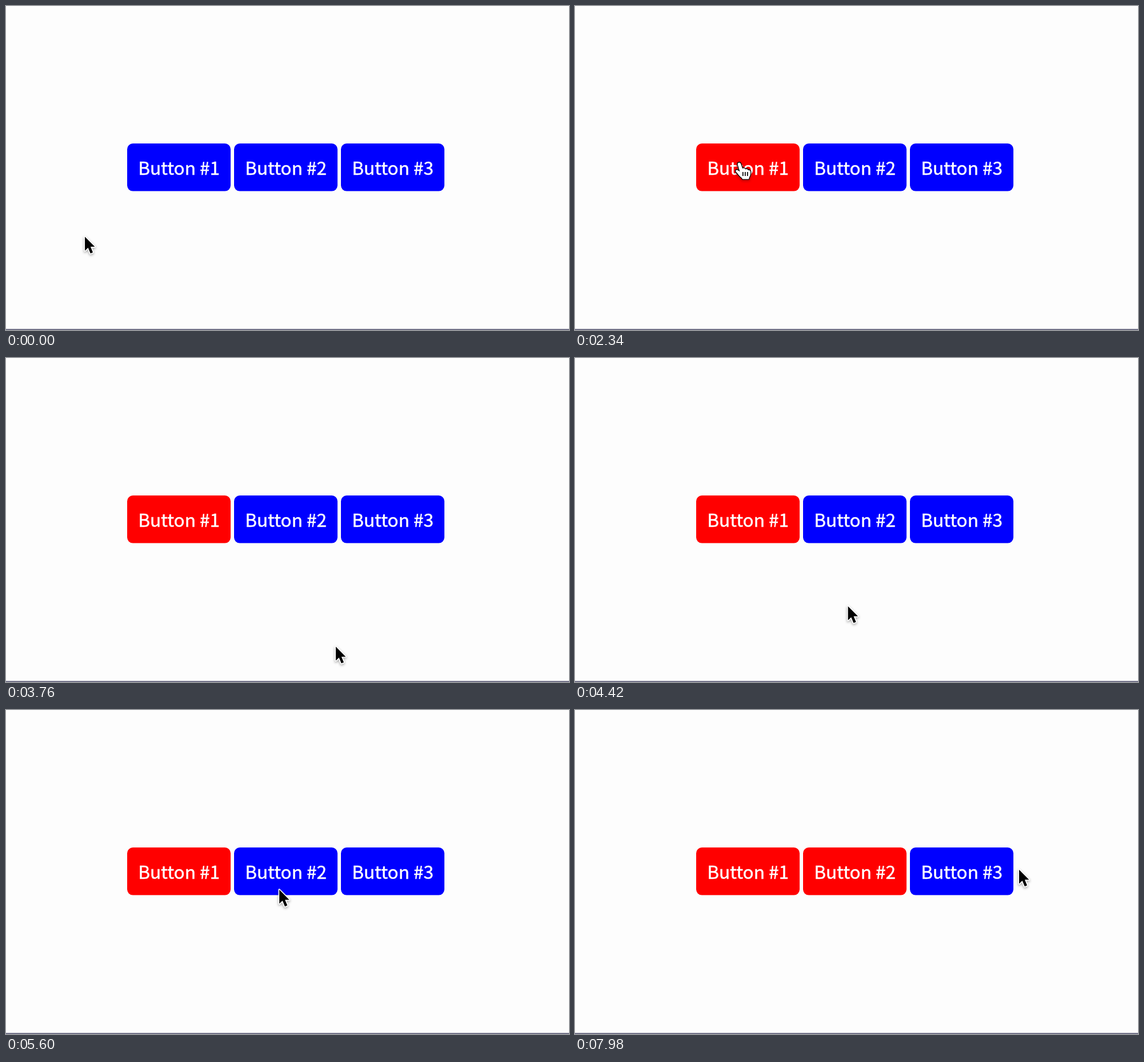
These frames come from a looping animation (985x568 px, 8000 ms). An HTML page with a canvas:

```html
<!DOCTYPE html>
<html lang="en">
<head>
<meta charset="utf-8">
<title>Buttons</title>
<style>
html, body { margin: 0; width: 100%; height: 100%; overflow: hidden; background: #fdfdfd; }
canvas { display: block; }
</style>
</head>
<body>
<canvas id="stage" width="985" height="568"></canvas>
<script>
const ctx = document.getElementById('stage').getContext('2d');
const LOOP = 8000;
const FONT = '31.5px "Noto Sans CJK JP", "Noto Sans CJK SC", "Noto Sans CJK", "Noto Sans", sans-serif';

const BOX = { x: 212, y: 241, w: 181, h: 83.6, r: 10, pitch: 187 };
const buttons = [1900, 7000, Infinity].map((clicked, i) => ({
  label: 'Button #' + (i + 1),
  x: BOX.x + i * BOX.pitch,
  clicked
}));

const point = (x, y) => ({ x, y });
const clamp = (v, lo, hi) => Math.min(hi, Math.max(lo, v));
const mix = (a, b, u) => a + (b - a) * u;

function ease(t, from, to) {
  const u = clamp((t - from) / (to - from), 0, 1);
  return u * u * (3 - 2 * u);
}

// Quick clockwise circles around the second button, slowly narrowing.
const ORBIT = { from: 3300, to: 5900, period: 562, leftmost: 5607 };
function orbit(time) {
  const t = clamp(time, ORBIT.from, ORBIT.to);
  const angle = (t - ORBIT.leftmost) / ORBIT.period * 2 * Math.PI;
  const rx = 75 + (5600 - t) * 0.0195;
  return point(553 - rx * Math.cos(angle), 301 - 210 * Math.sin(angle));
}

// Each move eases from wherever the pointer is to a goal.
const moves = [
  { from: 120, to: 830, goal: point(284, 186) },
  { from: 830, to: 1300, goal: point(287, 275) },
  { from: 2480, to: 3040, goal: point(434, 394) },
  { from: 3040, to: ORBIT.from, goal: orbit },
  { from: ORBIT.to, to: 6060, goal: point(555, 421) },
  { from: 6060, to: 6400, goal: point(477, 309) },
  { from: 7400, to: 7560, goal: point(461, 322) },
  { from: 7560, to: 7960, goal: point(777, 280) }
];

function pointerAt(t) {
  let p = point(138, 404.5);
  for (const { from, to, goal } of moves) {
    if (t < from) break;
    const q = typeof goal === 'function' ? goal(t) : goal;
    const u = ease(t, from, to);
    p = point(mix(p.x, q.x, u), mix(p.y, q.y, u));
  }
  return p;
}

const overButton = p => p.y >= BOX.y && p.y <= BOX.y + BOX.h &&
  buttons.some(b => p.x >= b.x && p.x <= b.x + BOX.w);

const arrow = new Path2D('M0 0V24.5L5.6 19.2L9.8 29.3L14 27.5L9.9 17.6H17.4Z');
const hand = new Path2D(
  'M-2.3 3C-3 -1 1.8 -1.8 3 1.5L6 10C8 8.5 10.5 9.5 11 11.5C13 10 15 11 15.7 13' +
  'C18 12 20 13.5 20 16C20.3 20 19.6 22 18 25L17 28.5H6L5 26.5' +
  'C1 24 -2 19 -5 16C-7.5 12.5 -3.5 11 -0.5 14L1.5 15.5Z');
const folds = new Path2D('M6.8 16V23M10.8 16V23M14.8 16V23');

function shadow(color, blur, dy) {
  ctx.shadowColor = color;
  ctx.shadowBlur = blur;
  ctx.shadowOffsetY = dy;
}

function drawPointer(t) {
  const p = pointerAt(t);
  // The pointer shape changes slightly after the pointer enters or leaves.
  const isHand = overButton(pointerAt(Math.max(0, t - 40)));
  const shape = isHand ? hand : arrow;
  ctx.save();
  ctx.translate(p.x, p.y);
  ctx.lineJoin = 'round';
  shadow('rgba(0,0,0,0.35)', 4, 2);
  ctx.strokeStyle = isHand ? '#000' : '#fff';
  ctx.lineWidth = isHand ? 2.6 : 3.4;
  ctx.stroke(shape);
  shadow('transparent', 0, 0);
  ctx.fillStyle = isHand ? '#fff' : '#000';
  ctx.fill(shape);
  if (isHand) {
    ctx.lineWidth = 1.7;
    ctx.stroke(folds);
  }
  ctx.restore();
}

function drawButton(b, t) {
  ctx.fillStyle = t >= b.clicked ? '#f00' : '#00f';
  ctx.beginPath();
  ctx.roundRect(b.x, BOX.y, BOX.w, BOX.h, BOX.r);
  ctx.fill();
  ctx.fillStyle = ctx.strokeStyle = '#fff';
  ctx.lineWidth = 0.5;
  ctx.fillText(b.label, b.x + 19.2, 296);
  ctx.strokeText(b.label, b.x + 19.2, 296);
}

function draw(t) {
  ctx.fillStyle = '#fdfdfd';
  ctx.fillRect(0, 0, 985, 568);
  ctx.fillStyle = '#73738a';
  ctx.fillRect(0, 566, 985, 2);
  ctx.font = FONT;
  buttons.forEach(b => drawButton(b, t));
  drawPointer(t);
}

const start = performance.now();
function tick() {
  draw((performance.now() - start) % LOOP);
  requestAnimationFrame(tick);
}
tick();
</script>
</body>
</html>
```
